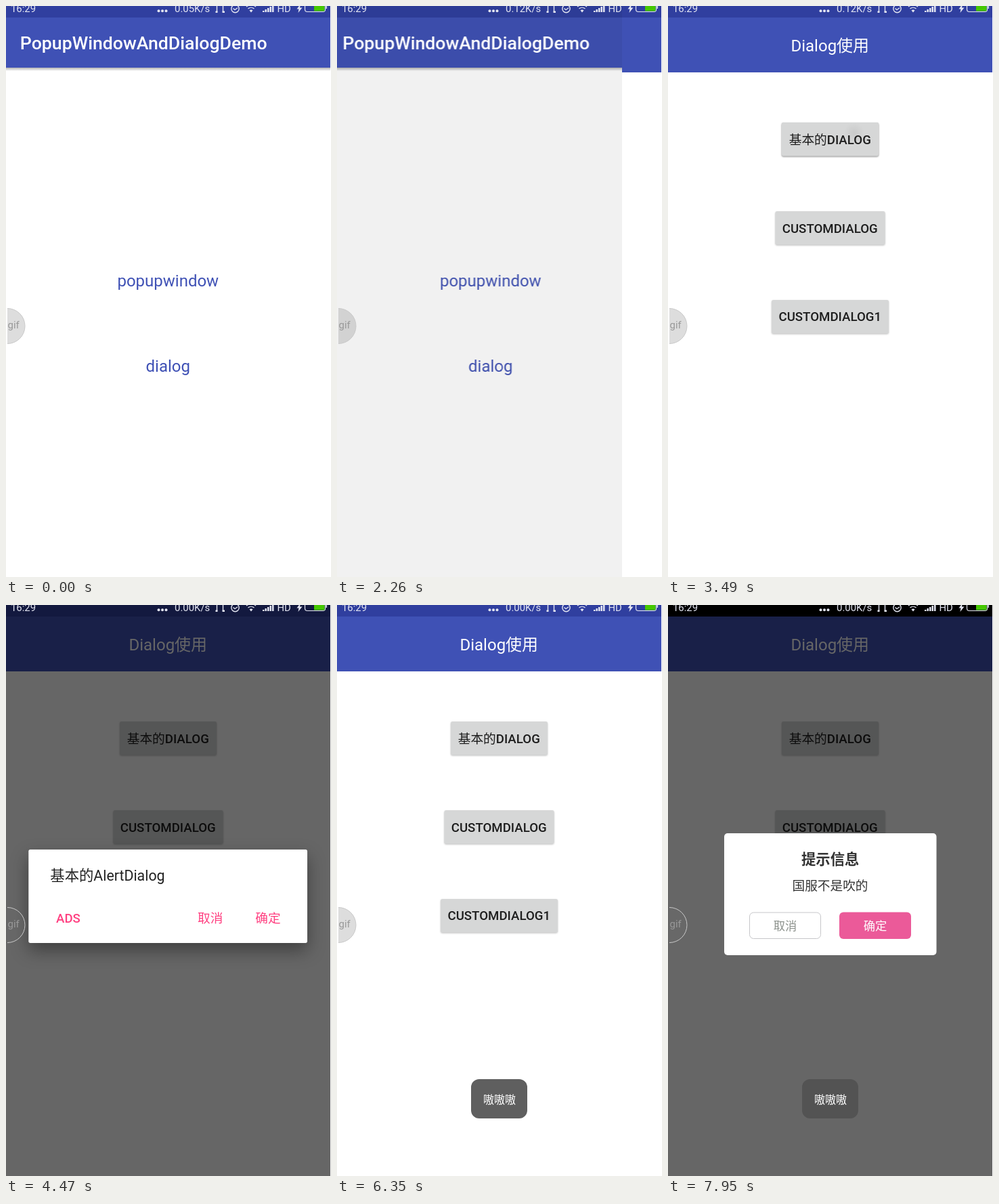
Write an HTML page that moves like this. It is 480 by 843 pixels and loops after 8000 ms.

```html
<!DOCTYPE html>
<html lang="zh-CN">
<head>
<meta charset="utf-8">
<title>Popup and dialog demo</title>
<style>
  html, body { margin: 0; width: 100%; height: 100%; overflow: hidden; background: #fff; }
  svg { display: block; width: 100%; height: 100%; }
  text { font-family: Roboto, "Noto Sans CJK SC", sans-serif; white-space: pre; }
  .mid { text-anchor: middle; }
  .t24 { font-size: 24px; }
  .t21 { font-size: 21.33px; }
  .t18 { font-size: 18.67px; }
  .t17 { font-size: 17.3px; }
  .t15 { font-size: 14.9px; }
  .med { font-weight: 500; }
  .reg { font-weight: 400; }
  .bar { fill: #3f51b5; }
  .status { fill: #303f9f; }
  .accent { fill: #ff4081; }
  .btn rect { fill: #d6d7d7; filter: drop-shadow(0 1px 1px rgba(0,0,0,.25)); }
  .btn text { fill: #1d1d1d; }
  .card { fill: #fff; }
  #alert .card { filter: drop-shadow(0 11px 13px rgba(0,0,0,.38)); }

  /* One 8 s timeline; every state is held until the next (1% = 80 ms). */
  .anim { animation: 8s step-end infinite; }
  #home { animation-name: home; }
  #shade { animation-name: shade; }
  #page { animation-name: page; }
  #press1 { animation-name: press1; }
  #press2 { animation-name: press2; }
  #dim { animation-name: dim; }
  #alert { animation-name: alert; }
  #custom { animation-name: custom; }
  #toast { animation-name: toast; }
  #speed1 { animation-name: speed1; }
  #speed2 { animation-name: speed2; }
  #speed3 { animation-name: speed3; }

  @keyframes home {
    0% { transform: none; }
    28.25% { transform: translateX(-12.5px); }
    29.5% { transform: translateX(-64px); }
    30.625% { transform: translateX(-87px); }
    31.75% { transform: translateX(-97px); }
    32.875% { transform: translateX(-101px); }
    34%, 100% { transform: translateX(-480px); }
  }
  @keyframes shade {
    0% { opacity: 0; }
    28.25% { opacity: .055; }
    29.5% { opacity: .28; }
    30.625% { opacity: .38; }
    31.75%, 100% { opacity: .43; }
  }
  @keyframes page {
    0% { transform: translateX(480px); }
    28.25% { transform: translateX(421px); }
    29.5% { transform: translateX(180px); }
    30.625% { transform: translateX(72px); }
    31.75% { transform: translateX(24px); }
    32.875% { transform: translateX(5px); }
    34%, 100% { transform: none; }
  }
  @keyframes press1 {
    0% { opacity: 0; }
    42.5% { opacity: .5; }
    43.625% { opacity: 1; }
    44.875% { opacity: .6; }
    46%, 100% { opacity: 0; }
  }
  @keyframes press2 {
    0% { opacity: 0; }
    90.875% { opacity: .5; }
    92.125% { opacity: 1; }
    94.5% { opacity: .6; }
    95.75%, 100% { opacity: 0; }
  }
  @keyframes dim {
    0% { opacity: 0; }
    44.875% { opacity: .14; }
    46% { opacity: .38; }
    47.125% { opacity: .55; }
    48.375% { opacity: .6; }
    74.75% { opacity: .52; }
    75.875% { opacity: .36; }
    77% { opacity: .19; }
    78.125% { opacity: .06; }
    79.375% { opacity: 0; }
    94.5% { opacity: .12; }
    95.75% { opacity: .33; }
    96.875% { opacity: .48; }
    98.125% { opacity: .57; }
    99.375%, 100% { opacity: .6; }
  }
  @keyframes alert {
    0% { opacity: 0; }
    44.875% { opacity: .4; }
    46% { opacity: .9; }
    47.125% { opacity: 1; }
    74.75% { opacity: .83; }
    75.875% { opacity: .45; }
    77% { opacity: .12; }
    78.125%, 100% { opacity: 0; }
  }
  @keyframes custom {
    0% { opacity: 0; }
    94.5% { opacity: .35; }
    95.75% { opacity: .85; }
    96.875%, 100% { opacity: 1; }
  }
  @keyframes toast {
    0% { opacity: 0; }
    77% { opacity: .3; }
    78.125% { opacity: .75; }
    79.375%, 100% { opacity: 1; }
  }
  @keyframes speed1 { 0% { opacity: 1; } 1.125%, 100% { opacity: 0; } }
  @keyframes speed2 { 0% { opacity: 0; } 1.125% { opacity: 1; } 55.875%, 100% { opacity: 0; } }
  @keyframes speed3 { 0% { opacity: 0; } 55.875%, 100% { opacity: 1; } }
</style>
</head>
<body>
<svg viewBox="0 0 480 843" preserveAspectRatio="none">
  <defs>
    <linearGradient id="fall" x2="0" y2="1">
      <stop stop-opacity=".3"/>
      <stop offset="1" stop-opacity="0"/>
    </linearGradient>
    <radialGradient id="spot">
      <stop stop-opacity=".06"/>
      <stop offset="1" stop-opacity="0"/>
    </radialGradient>
  </defs>

  <g id="home" class="anim">
    <rect width="480" height="843" fill="#fff"/>
    <rect class="bar" width="480" height="91"/>
    <rect class="status" width="480" height="17"/>
    <rect y="91" width="480" height="5" fill="url(#fall)"/>
    <g class="bar t24 mid">
      <text x="239.3" y="414">popupwindow</text>
      <text x="239.3" y="540">dialog</text>
    </g>
    <rect id="shade" class="anim" width="480" height="843"/>
    <text class="med" x="20.8" y="64" font-size="26.67" fill="#fff">PopupWindowAndDialogDemo</text>
  </g>

  <g id="page" class="anim">
    <rect width="480" height="843" fill="#fff"/>
    <rect class="bar" width="480" height="98"/>
    <rect class="status" width="480" height="17"/>
    <text class="t24 mid" x="239.3" y="67.3" fill="#fff">Dialog使用</text>
    <g class="btn t18 med mid">
      <rect x="168" y="172" width="143" height="49.5" rx="2.7"/>
      <rect x="158.5" y="303" width="162" height="49.5" rx="2.7"/>
      <rect x="153" y="434" width="173" height="49.5" rx="2.7"/>
      <g id="press1" class="anim">
        <rect x="168" y="172" width="143" height="49.5" rx="2.7"/>
        <circle cx="275" cy="187" r="15" fill="url(#spot)"/>
      </g>
      <g id="press2" class="anim">
        <rect x="158.5" y="303" width="162" height="49.5" rx="2.7"/>
        <circle cx="250" cy="328" r="24" fill="url(#spot)"/>
      </g>
      <text x="239.3" y="204"><tspan class="reg">基本的</tspan>DIALOG</text>
      <text x="239.3" y="334.5">CUSTOMDIALOG</text>
      <text x="239.3" y="465.3">CUSTOMDIALOG1</text>
    </g>
  </g>

  <rect id="dim" class="anim" width="480" height="843"/>

  <g id="alert" class="anim">
    <rect class="card" x="33.3" y="361" width="411.7" height="138" rx="2.7"/>
    <text class="t21" x="65.3" y="407" fill="#212121">基本的AlertDialog</text>
    <g class="accent t18">
      <text class="med" x="74" y="469">ADS</text>
      <text x="283" y="469">取消</text>
      <text x="368.3" y="469">确定</text>
    </g>
  </g>

  <g id="custom" class="anim mid">
    <rect width="480" height="17"/>
    <rect class="card" x="83" y="337" width="313.5" height="180" rx="5"/>
    <text class="t21" x="239.7" y="383" font-weight="700" fill="#333">提示信息</text>
    <text class="t18" x="239.5" y="420.5" fill="#333">国服不是吹的</text>
    <rect x="120.5" y="454" width="105" height="38.5" rx="6" fill="#fff" stroke="#c6c6c9"/>
    <rect x="253" y="453.5" width="106" height="39.5" rx="6" fill="#eb5a99"/>
    <text class="t17" x="173" y="480" fill="#8c918c">取消</text>
    <text class="t17" x="306" y="480" fill="#fff">确定</text>
  </g>

  <g id="toast" class="anim">
    <rect x="198" y="700" width="83" height="58" rx="12" fill="#525252" fill-opacity=".92"/>
    <text class="mid" x="240" y="735.5" font-size="16" fill="#fff">嗷嗷嗷</text>
  </g>

  <!-- floating recorder badge -->
  <path d="M2 446.5a25.8 25.8 0 0 1 0 52" fill="#707070" fill-opacity=".24" stroke="#c8c8c8"/>
  <text x="2.5" y="476" font-size="15" fill="#999">gif</text>

  <!-- status icons -->
  <g class="t15" fill="#e4e6f2">
    <text x="7" y="9">16:29</text>
    <g text-anchor="end">
      <text id="speed1" class="anim" x="301.3" y="9">0.05K/s</text>
      <text id="speed2" class="anim" x="301.3" y="9">0.12K/s</text>
      <text id="speed3" class="anim" x="301.3" y="9">0.00K/s</text>
    </g>
    <text x="400.5" y="9">HD</text>
    <circle cx="225.5" cy="7.3" r="2"/>
    <circle cx="231" cy="7.3" r="2"/>
    <circle cx="236.5" cy="7.3" r="2"/>
    <path d="M309.5 7.5h3v2.500h-3zM319.5 7.5h3.500v2.500h-3.500z"/>
    <path d="M379 9V7h2.500v2zM382.5 9V5H385v4zM386 9V3h2.500v6zM389.5 9V1H392v8zM393 9V-2h2.500V9z"/>
    <path d="M362 9.500l-2.500-3a4 4 0 0 1 5 0z"/>
    <path d="M435-3l-5.500 7.500h3l-1 5.500 6-7.500h-3.500z"/>
    <g fill="none" stroke="#e4e6f2" stroke-width="1.4">
      <path d="M311.5 9V0M320.5 9V0"/>
      <circle cx="338.5" cy="4" r="5.7"/>
      <path d="M335.5 3.500l2.500 2.200 4-3M357.5 4a7 7 0 0 1 9 0M355 1a11 11 0 0 1 14 0"/>
      <rect x="441.5" y="-5" width="30" height="13.5" rx="3.5" stroke-width="1.2"/>
    </g>
    <path d="M455-3h15.500v10.500H455z" fill="#45c800"/>
    <path d="M472.5 0h1.500v4h-1.500z"/>
  </g>

  <!-- the recording ends one pixel short of the stage -->
  <rect x="479" width="1" height="843" fill="#fff"/>
</svg>
</body>
</html>
```
